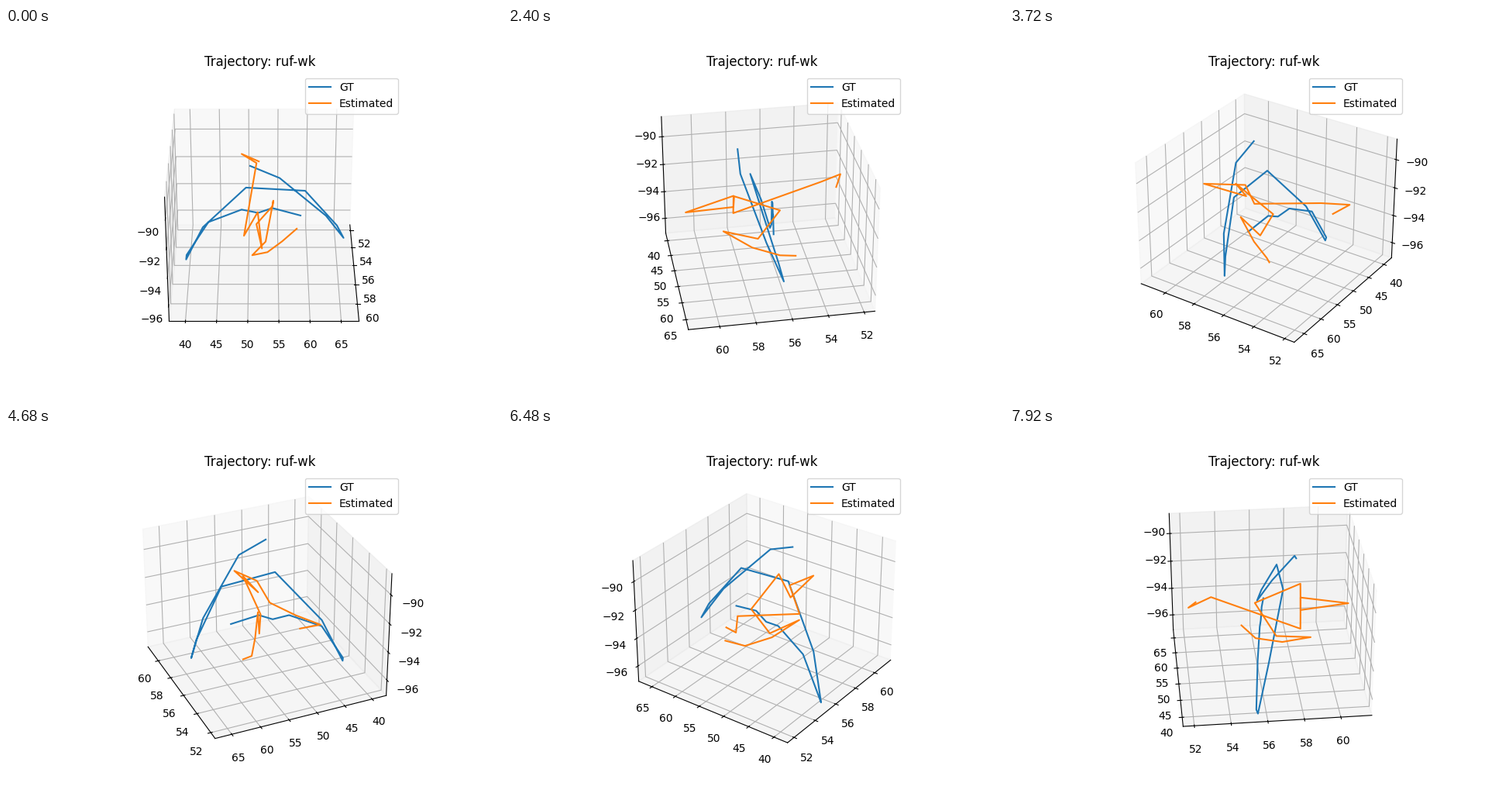
A matplotlib script for the animation above (8000 ms loop, 640x480 px).

```python
import numpy as np
import matplotlib.pyplot as plt
from matplotlib.animation import FuncAnimation

INTERVAL = 40        # ms per tick
FRAMES = 200         # 8 s loop
HOLD = 3             # ticks per camera step (120 ms)
STEP = 4             # degrees of azimuth per camera step

CENTER = np.array([56.55, 52.62, -92.85])
SCALE = np.array([23.07, 7.804, 20.85])      # view units per data unit
HALF = np.array([118.92, 118.92, 89.19])     # half size of the box in view units


def curve(t, *polys):
    """Nodes whose coordinates are polynomials of t, highest power first."""
    return np.column_stack([np.polyval(p, t) for p in polys])


def ground_truth():
    """Three sweeps along y: rise, arch across the box, flat return."""
    same = [1, 0]
    rise = curve(np.array([-17.3, 19.4, 79.4]),
                 [-0.0046, 0.078, 36.4], same, [-0.0072, -0.415, 80.6])
    arch = curve(np.array([103.8, 94.4, 52.1, -22.9, -79.8, -103.8]),
                 [-0.0032, 0.094, 20.5], same,
                 [-2e-7, 0, -0.0089, 0.218, 55])
    y = np.array([-103.1, -73, -29.2, -7.6, 10.6, 47.1])
    back = curve(y, [0.162, -9], same, [7.1e-5, -0.0015, -0.154, -3])
    back[:, 2] += 0.8 * y * np.exp(-(y / 20) ** 2)
    return np.vstack([rise, arch, back])


def estimated():
    """A jagged start through key points, then a smooth tail."""
    keys = [(-93.5, -7, 24), (-104, -30, 29.7), (-74, -10, 32),
            (39, -25.6, -12.4), (41, -8, 23.5), (104, -2.6, 8.3),
            (41, -9.7, 6), (43, 10.7, 33.4), (-16, 12, 7.7), (11, 2, -38)]
    tail = curve(np.arange(4), [2.5, -6.8, -30.4, 53.9], [19.4, -15],
                 [6.5, -23.2, -32.3])
    return np.vstack([keys, tail])


fig = plt.figure(figsize=(6.4, 4.8), dpi=100)
ax = fig.add_subplot(projection="3d")

for nodes, label in ((ground_truth(), "GT"), (estimated(), "Estimated")):
    ax.plot(*(CENTER + nodes / SCALE).T, label=label)

low, high = CENTER - HALF / SCALE, CENTER + HALF / SCALE
for set_lim, lo, hi in zip((ax.set_xlim, ax.set_ylim, ax.set_zlim), low, high):
    set_lim(lo, hi, view_margin=0)

ax.set_title("Trajectory: ruf-wk")
ax.legend()


def update(i):
    ax.view_init(elev=30, azim=i // HOLD * STEP)
    return ax.lines


anim = FuncAnimation(fig, update, frames=FRAMES, interval=INTERVAL,
                     repeat=True, repeat_delay=0, blit=False)
plt.show()
```
